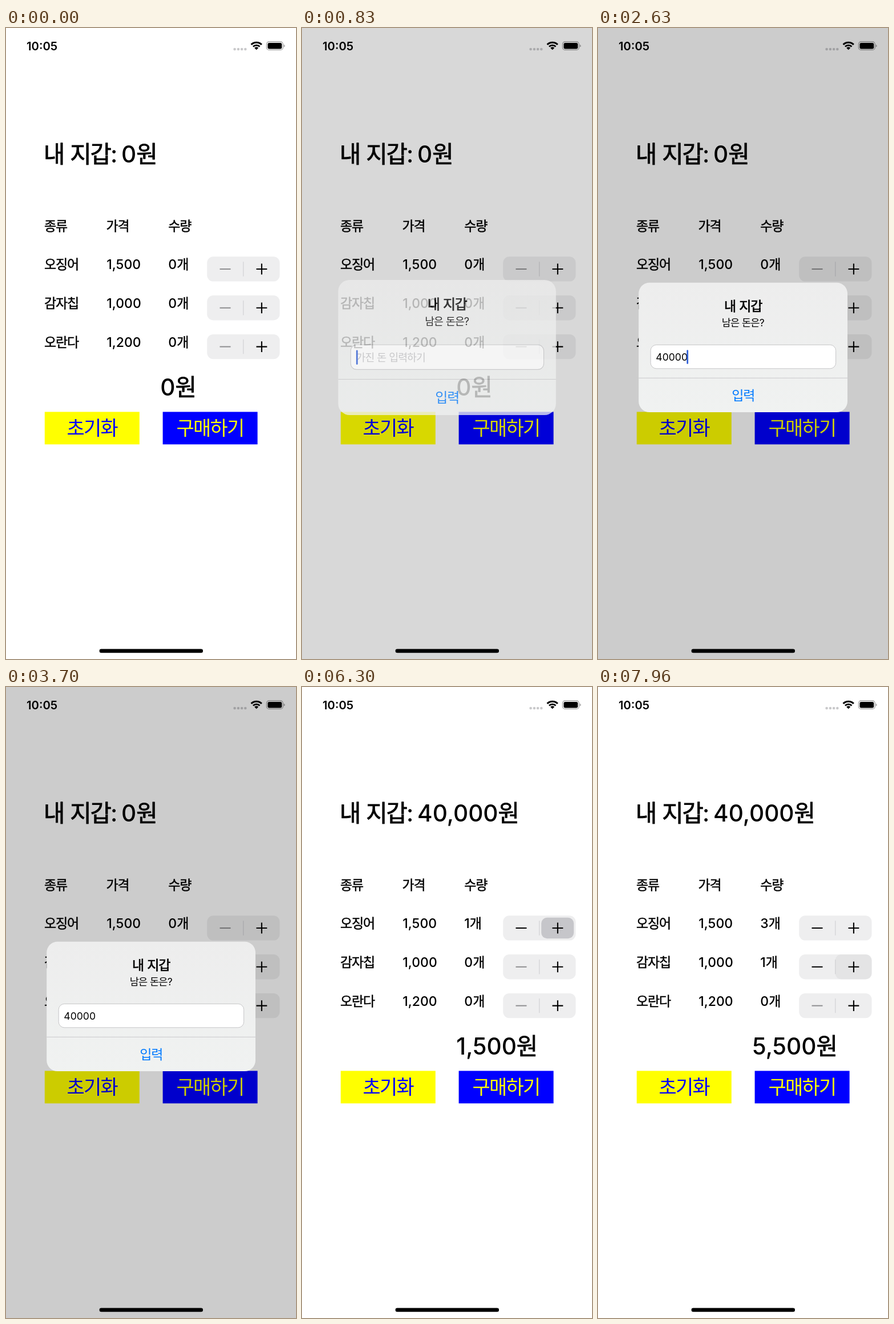
An HTML page for the animation above (8 s loop, 508 px wide and 1102 px high).

```html
<!DOCTYPE html>
<html lang="ko">
<head>
<meta charset="utf-8">
<title>내 지갑</title>
<style>
  html, body { margin: 0; width: 100%; height: 100%; overflow: hidden; background: #fff; }
  svg { display: block; width: 100%; height: 100%; }
  text { font-family: Inter, Roboto, sans-serif; white-space: pre; stroke-width: 0; }
  .ko {
    font-family: "Noto Sans CJK KR", "Noto Sans CJK", sans-serif;
    font-weight: 400;
    letter-spacing: -.05em;
    word-spacing: .04em;
    stroke-width: var(--bold);
  }
</style>
</head>
<body>
<svg id="stage" viewBox="0 0 508 1102" xmlns="http://www.w3.org/2000/svg"></svg>
<script>
const LOOP = 8000, TICK = 200 / 3;
const ROWS = [["오징어", 1500], ["감자칩", 1000], ["오란다", 1200]];
const PRESSES = [
  { at: 6300, row: 0, hold: 30 },
  { at: 6833, row: 0, hold: 30 },
  { at: 7033, row: 0, hold: 30 },
  { at: 7833, row: 1, hold: 60 }
];
const KEYS = [1966, 2166, 2300, 2433, 2633];
const TYPED = "40000";
const EXTRA = { 400: 0, 500: .02, 600: .03 };   // stroke added to Hangul, in em

const clamp = v => Math.max(0, Math.min(1, v));
const ramp = (t, from, span) => clamp((t - from) / span);
const money = n => n.toLocaleString("en-US");

// Critically damped spring from 0 to 1
function spring(t, start) {
  const x = Math.max(0, t - start) * .0192;
  return 1 - (1 + x) * Math.exp(-x);
}

// Hangul runs get their own font and spacing
const runs = s => s.replace(/[가-힣]+(?: [가-힣]+)*/g, m => `<tspan class="ko">${m}</tspan>`);

function label(x, y, size, str, { weight = 500, color = "#000", anchor = "start", id = "" } = {}) {
  return `<text id="${id}" x="${x}" y="${y}" font-size="${size}" font-weight="${weight}"
    fill="${color}" stroke="${color}" text-anchor="${anchor}"
    style="--bold:${EXTRA[weight]}em">${runs(str)}</text>`;
}

const rect = (x, y, w, h, fill, r = 0, more = "") =>
  `<rect x="${x}" y="${y}" width="${w}" height="${h}" rx="${r}" fill="${fill}" ${more}/>`;

const line = (d, color, width, more = "") =>
  `<path d="${d}" fill="none" stroke="${color}" stroke-width="${width}" ${more}/>`;

function arc(r) {
  const d = r * .704;
  return `M${438.7 - d} ${38.2 - d}A${r} ${r} 0 0 1 ${438.7 + d} ${38.2 - d}`;
}

function statusBar() {
  const dots = [400.6, 406.9, 413.1, 419.3]
    .map(x => `<circle cx="${x}" cy="37" r="2.3" fill="#c9c9cb"/>`).join("");
  return label(36, 38.7, 20.3, "10:05", { weight: 600 }) + dots
    + line(arc(13), "#000", 3) + line(arc(8.2), "#000", 2.8)
    + `<path d="${arc(5)}L438.7 38.2Z"/>`
    + rect(456.4, 24, 28.8, 14.4, "none", 4.4, 'stroke="#a4a4a4" stroke-width="1.3"')
    + rect(458.4, 26, 24.8, 10.4, "#000", 2.6)
    + `<path d="M486.6 28.8q2 .7 2 2.4t-2 2.4z" fill="#a4a4a4"/>`;
}

function itemRow([name, price], i) {
  const base = 421.4 + i * 67.8, top = 399.3 + i * 67.8, mid = top + 21.7;
  return label(67, base, 23, name) + label(176.3, base, 23, money(price))
    + label(284.3, base, 23, "0개", { id: "count" + i })
    + rect(352.2, top, 127.3, 43.3, "#eeeeef", 11)
    + line(`M415.8 ${top + 9}v25.4`, "#d3d3d6", 1.3)
    + rect(0, 0, 0, 0, "#c6c6ca", 10, `id="press${i}"`)
    + line(`M374.5 ${mid}h19`, "#8e8e90", 2, `id="minus${i}"`)
    + line(`M438.5 ${mid}h18.8m-9.4 -9.4v18.8`, "#000", 2.1);
}

const button = (x, fill, color, str) =>
  rect(x, 670.4, 166, 56.8, fill)
  + label(x + 83, 710.6, 33.9, str, { weight: 400, color, anchor: "middle" });

function alertBox() {
  const mid = { anchor: "middle" };
  return `<g id="alert">`
    + rect(71.2, 444.8, 365.8, 226.3, "url(#frost)", 19)
    + label(254.2, 493.6, 23, "내 지갑", { ...mid, weight: 600 })
    + label(254.2, 520.6, 17.6, "남은 돈은?", { ...mid, weight: 400 })
    + rect(92.2, 553.4, 324.4, 41.4, "#fff", 10, 'stroke="#c6c6c8" stroke-width="1"')
    + label(101, 581.4, 17.6, "가진 돈 입력하기", { weight: 400, color: "#c4c4c6", id: "hint" })
    + label(101.3, 581.4, 17.6, "", { weight: 400, id: "field" })
    + rect(0, 562.3, 2.7, 24.4, "#2f5fd8", 1.3, 'id="caret"')
    + `<path id="tap" d="M71.2 611.5h365.8v40.6a19 19 0 0 1 -19 19h-327.8a19 19 0 0 1 -19 -19z" fill="#000" fill-opacity=".07"/>`
    + line("M71.2 611.3h365.8", "#c9c9cb", 1)
    + label(254.2, 649.8, 23, "입력", { ...mid, weight: 400, color: "#007aff" })
    + `</g>`;
}

const stage = document.getElementById("stage");
stage.innerHTML = `<defs><linearGradient id="frost" x2="0" y2="1">
    <stop offset="0" stop-color="#ededed"/><stop offset="1" stop-color="#f0f2f1"/>
  </linearGradient></defs>`
  + rect(0, 0, 508, 1102, "#fff")
  + statusBar()
  + label(66, 235, 40.6, "내 지갑:")
  + label(202, 235, 40.6, "0원", { id: "wallet" })
  + ["종류", "가격", "수량"].map((s, i) => label(67 + i * 108.6, 353.6, 23, s)).join("")
  + ROWS.map(itemRow).join("")
  + label(270.3, 642, 40.6, "0원", { id: "total" })
  + button(67.8, "#ff0", "#00f", "초기화")
  + button(274.6, "#00f", "#ff0", "구매하기")
  + rect(163.6, 1084.6, 181.4, 6.6, "#000", 3.3)
  + rect(0, 0, 508, 1102, "#000", 0, 'id="dim"')
  + alertBox();

const $ = id => document.getElementById(id);
const setText = (id, str) => {
  const el = $(id);
  if (el.dataset.str !== str) {
    el.dataset.str = str;
    el.innerHTML = runs(str);
  }
};
function set(id, attrs) {
  for (const k in attrs) $(id).setAttribute(k, attrs[k]);
}

// Blink until the first key, solid while typing, then blink again
function caretAlpha(t) {
  if (t < 1960) return 1 - ramp(t, 1250, 180) + ramp(t, 1583, 180);
  if (t < 3690) return 1 - ramp(t, 3110, 180) + ramp(t, 3520, 180);
  return 0;
}

function drawAlert(t) {
  const shown = spring(t, 690);
  const alpha = t > 4150 ? 0 : shown * (1 - spring(t, 3700));
  const scale = 1 + .178 * (1 - shown);
  const typed = KEYS.filter(k => t >= k - 5).length;
  set("dim", { opacity: .2 * alpha });
  set("alert", {
    opacity: alpha,
    transform: `translate(254.2 558) scale(${scale}) translate(-254.2 -558)`
  });
  setText("field", TYPED.slice(0, typed));
  set("hint", { opacity: typed ? 0 : 1 });
  set("caret", { x: 101.4 + 10.8 * typed, opacity: clamp(caretAlpha(t)) });
  set("tap", { opacity: t > 3555 && t < 3690 ? 1 : 0 });
}

function drawShop(t) {
  const done = PRESSES.filter(p => t >= p.at - 5);
  let total = 0;
  ROWS.forEach(([, price], i) => {
    const mine = done.filter(p => p.row === i), last = mine[mine.length - 1];
    const fade = last ? ramp(t, last.at + last.hold, 100) : 1;
    const inset = 3.4 * (1 - clamp(fade * 1.5));
    total += mine.length * price;
    setText("count" + i, mine.length + "개");
    set("minus" + i, { stroke: mine.length ? "#000" : "#8e8e90" });
    set("press" + i, {
      x: 415.8 + inset, y: 399.3 + i * 67.8 + inset,
      width: 63.7 - 2 * inset, height: 43.3 - 2 * inset,
      opacity: 1 - fade
    });
  });
  setText("total", money(total) + "원");
  setText("wallet", (t > 4150 ? money(+TYPED) : "0") + "원");
}

// The screen refreshes fifteen times a second
function render(ms) {
  const t = Math.max(0, Math.floor((ms + 7 - TICK / 2) / TICK) * TICK + TICK / 2);
  drawAlert(t);
  drawShop(t);
}

const start = performance.now();
function loop() {
  render((performance.now() - start) % LOOP);
  requestAnimationFrame(loop);
}
loop();
</script>
</body>
</html>
```
